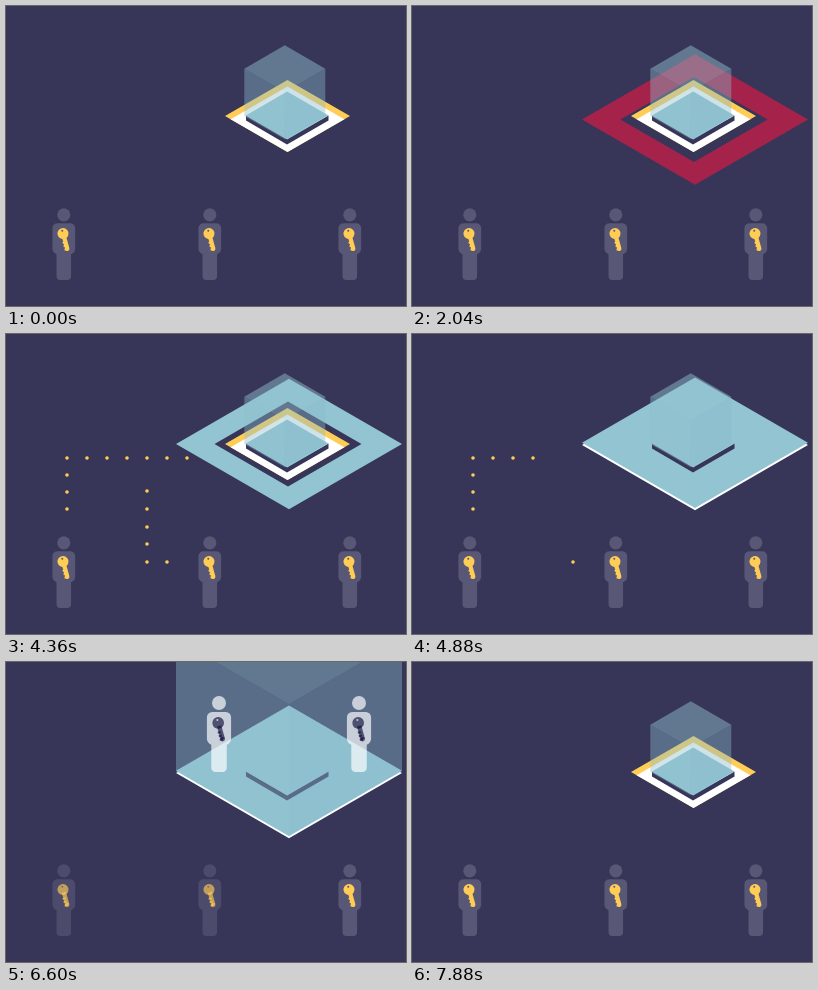
An HTML page with a canvas that plays this animation: 400x300 px, repeating every 8.4 s.

```html
<!DOCTYPE html>
<html>
<head>
<meta charset="utf-8">
<style>
html, body { margin: 0; width: 100%; height: 100%; overflow: hidden; background: #373558; }
canvas { display: block; }
</style>
</head>
<body>
<canvas id="stage" width="400" height="300"></canvas>
<script>
const ctx = document.getElementById('stage').getContext('2d');
const LOOP = 8400;
const NIGHT = '#373558', YELLOW = '#ffcd55', WHITE = '#fff', BLUE = '#93c4d2', RED = '#f01743';
const SLOPE = 0.577, RISE = 1.168;

const ramp = (t, a, b) => Math.min(1, Math.max(0, (t - a) / (b - a)));
const mix = (a, b, p) => a + (b - a) * p;
const easeOut = p => 1 - (1 - p) ** 3;

function poly(points, color, alpha = 1) {
  ctx.save();
  ctx.globalAlpha *= alpha;
  ctx.fillStyle = color;
  ctx.beginPath();
  points.forEach(([x, y]) => ctx.lineTo(x, y));
  ctx.fill();
  ctx.restore();
}

const diamond = (x, y, w, h = w * SLOPE) => [[x - w, y], [x, y - h], [x + w, y], [x, y + h]];

function disc(x, y, r, color) {
  ctx.fillStyle = color;
  ctx.beginPath();
  ctx.arc(x, y, r, 0, 7);
  ctx.fill();
}

function key(color, hole) {
  ctx.save();
  ctx.translate(-0.8, 18.7);
  ctx.rotate(-0.27);
  disc(0, 0, 5.5, color);
  ctx.fillRect(-2, 3, 4.2, 13);
  disc(0, 16, 2.1, color);
  for (const y of [8, 11.5, 15]) ctx.fillRect(-2.8, y, 3, 2);
  disc(0, -2.8, 1, hole);
  ctx.restore();
}

// The origin of a person is the centre of the head.
function person(x, y, scale, alpha, body, keyColor, hole) {
  if (alpha <= 0) return;
  ctx.save();
  ctx.globalAlpha = alpha;
  ctx.translate(x, y);
  ctx.scale(scale, scale);
  ctx.fillStyle = body;
  ctx.beginPath();
  ctx.arc(0, 0, 6.6, 0, 7);
  ctx.fill();
  ctx.beginPath();
  ctx.moveTo(-6.5, 8.4);
  ctx.arcTo(11.4, 8.4, 11.4, 14, 5);
  ctx.lineTo(11.4, 34);
  ctx.quadraticCurveTo(11.2, 37.5, 7.3, 39.5);
  ctx.arcTo(7.3, 65.2, 0, 65.2, 4);
  ctx.arcTo(-7.3, 65.2, -7.3, 60, 4);
  ctx.lineTo(-7.3, 39.5);
  ctx.quadraticCurveTo(-11.2, 37.5, -11.4, 34);
  ctx.arcTo(-11.4, 8.4, -6, 8.4, 5);
  ctx.fill();
  key(keyColor, hole);
  ctx.restore();
}

// Dots in the order in which they light up.
const row = (from, to) => {
  const out = [];
  for (let x = from; x <= to; x += 20) out.push([x, 124]);
  return out;
};
const climb = [[61, 175], [61, 158], [61, 141]];
const branch = [[161, 228], [141, 228], [141, 210], [141, 193], [141, 175], [141, 157]];
const soloPath = [...climb, ...row(61, 181)];
const jointPath = [...climb, ...row(61, 121), ...branch, ...row(141, 181)];

function dots(path, t, start, step, back, backStep) {
  const last = path.length - 1;
  path.forEach(([x, y], i) => {
    if (t >= start + step * i && t < back + backStep * (last - i)) disc(x, y, 1.8, YELLOW);
  });
}

function ring(y, outer, hole, color, alpha = 1) {
  ctx.save();
  ctx.globalAlpha = alpha;
  ctx.fillStyle = color;
  ctx.beginPath();
  for (const [w, x] of [[outer, 283], [hole, 282]]) {
    if (w <= 0) continue;
    diamond(x, y, w).forEach(([px, py], i) => i ? ctx.lineTo(px, py) : ctx.moveTo(px, py));
    ctx.closePath();
  }
  ctx.fill('evenodd');
  ctx.restore();
}

function refusal(t) {
  if (t < 880 || t >= 2160) return;
  const grow = easeOut(ramp(t, 840, 1120));
  const y = mix(110, 114, ramp(t, 960, 1120)) - 0.5 * ramp(t, 1400, 1720);
  if (t >= 1100 && t < 1220) {
    ctx.fillStyle = WHITE;
    ctx.beginPath();
    ctx.moveTo(227, 126);
    ctx.lineTo(231, 123.5);
    ctx.quadraticCurveTo(257, 131, 268, 149);
    ctx.fill();
  }
  ring(y, mix(74, 113, grow), 73.5, RED, 1 - ramp(t, 1960, 2160));
}

function approval(t) {
  if (t < 3740 || t >= 7880) return;
  const size = easeOut(ramp(t, 3720, 4160)) * (1 - ramp(t, 7640, 7880));
  const outer = mix(74, 113, size);
  const closed = ramp(t, 4580, 5000) - ramp(t, 7440, 7680);
  const hole = 73.5 * (1 - closed);
  const lift = ramp(t, 4400, 4560) - ramp(t, 7560, 7680);
  if (lift > 0) ring(110 + lift, outer, hole, WHITE);
  ring(110 - 1.2 * lift, outer, hole, BLUE);
}

function base() {
  const tile = diamond(281.5, 110, 62.5, 36);
  poly(tile, YELLOW);
  ctx.save();
  ctx.beginPath();
  tile.forEach(([x, y]) => ctx.lineTo(x, y));
  ctx.clip();
  poly(diamond(281.5, 116.5, 62.5, 36), WHITE);
  ctx.restore();
}

function platform() {
  poly([[240, 109.5], [281, 133], [322.5, 109.5], [322.5, 114.5], [281, 138.5], [240, 114.5]], NIGHT);
  poly(diamond(281.2, 109.5, 41.3, 24), BLUE);
}

function cube(t) {
  const p = ramp(t, 5013, 5520) - ramp(t, 7120, 7640);
  const w = mix(40.5, 113, p), h = w * SLOPE, x = mix(278.8, 283, p);
  const floor = mix(110, 109, p), top = floor - w * RISE;
  poly(diamond(x, top, w), '#8fc0cd', 0.48);
  poly([[x - w, top], [x, top + h], [x, floor + h], [x - w, floor]], '#8dbdcd', 0.41);
  poly([[x, top + h], [x + w, top], [x + w, floor], [x, floor + h]], '#89b9ca', 0.41);
}

function draw(t) {
  ctx.globalAlpha = 1;
  ctx.fillStyle = NIGHT;
  ctx.fillRect(0, 0, 400, 300);

  dots(soloPath, t, 160, 44, 1600, 40);
  dots(jointPath, t, 2800, 60, 4470, 55);

  base();
  refusal(t);
  approval(t);
  platform();
  cube(t);

  const inside = ramp(t, 5960, 6120) - ramp(t, 7100, 7260);
  for (const x of [213, 353]) person(x, 41, 1.06, inside * 0.68, WHITE, '#16133f', WHITE);

  const outside = 1 - ramp(t, 6560, 6680) + ramp(t, 7100, 7280);
  [[57.8, outside], [203.8, outside], [343.8, 1]].forEach(([x, alpha]) =>
    person(x, 208.8, 1, alpha, '#585776', YELLOW, '#585776'));
}

function tick() {
  draw(performance.now() % LOOP);
  requestAnimationFrame(tick);
}
tick();
</script>
</body>
</html>
```
